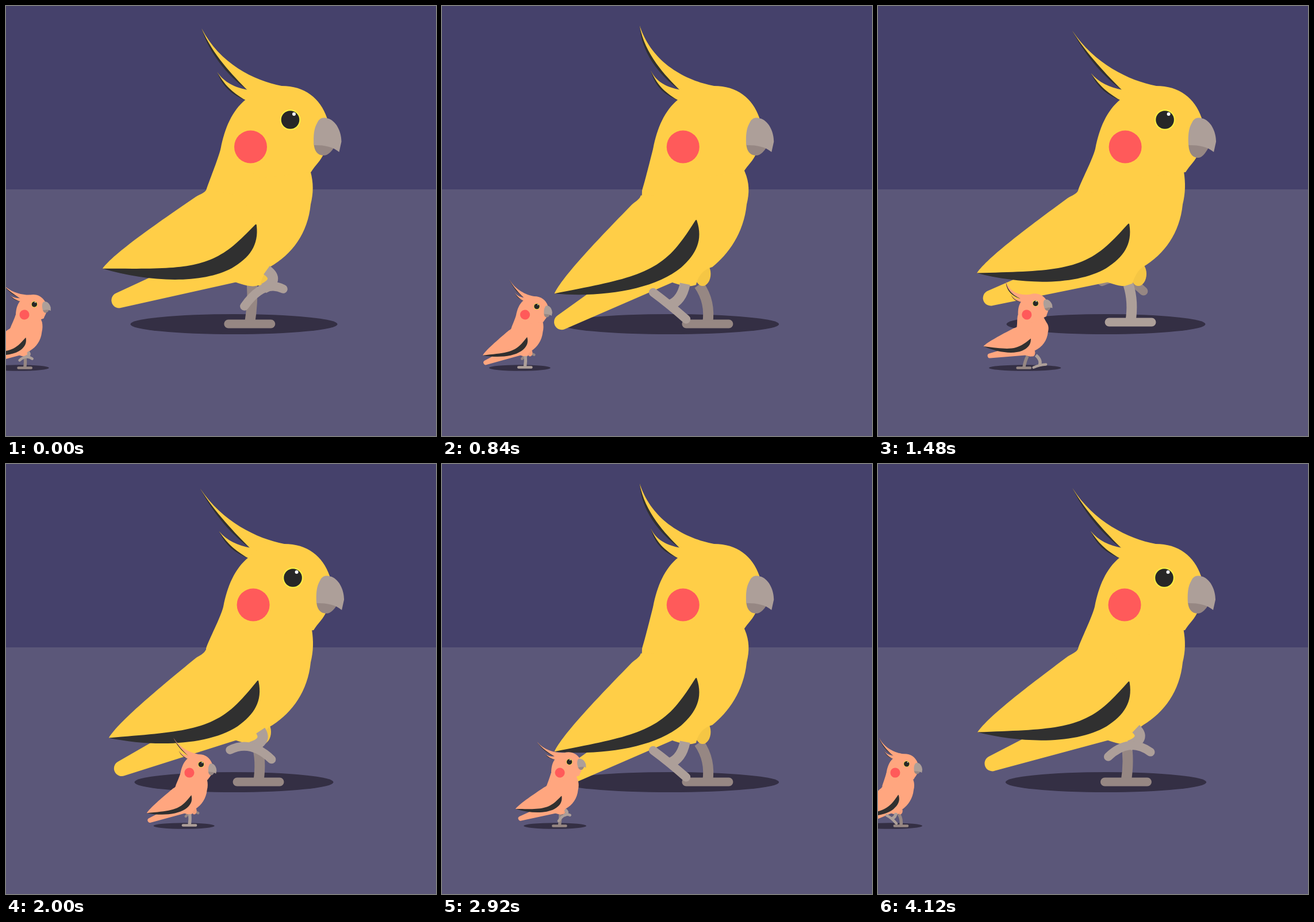
Write an HTML page with a canvas that moves like this. It is 748 by 748 pixels and loops after 4.16 s.

```html
<!DOCTYPE html>
<html>
<head>
<meta charset="utf-8">
<style>
html, body { margin: 0; height: 100%; overflow: hidden; background: #5b5779; }
canvas { display: block; }
</style>
</head>
<body>
<canvas id="stage" width="748" height="748"></canvas>
<script>
const ctx = document.getElementById('stage').getContext('2d');
const LOOP = 4160, STEP = 1040, RAD = Math.PI / 180;
const INK = '#303030', LIGHT = '#ad9f99', DARK = '#968783';

const wave = (t, peak, period) => Math.cos(2 * Math.PI * (t - peak) / period);
const ease = s => s * s * (3 - 2 * s);
const clamp = v => Math.min(1, Math.max(0, v));

function fill(d, color) {
  ctx.fillStyle = color;
  ctx.fill(new Path2D(d));
}

function oval(x, y, rx, ry, color) {
  ctx.fillStyle = color;
  ctx.beginPath();
  ctx.ellipse(x, y, rx, ry, 0, 0, 7);
  ctx.fill();
}

function turned(x, y, degrees, draw) {
  ctx.save();
  ctx.translate(x, y);
  ctx.rotate(degrees * RAD);
  ctx.translate(-x, -y);
  draw();
  ctx.restore();
}

function bend(x1, y1, cx, cy, x2, y2, width, cap) {
  ctx.lineWidth = width;
  ctx.lineCap = cap;
  ctx.beginPath();
  ctx.moveTo(x1, y1);
  ctx.quadraticCurveTo(cx, cy, x2, y2);
  ctx.stroke();
}

// Half of the cycle the foot slides back on the ground, half it swings forward
function leg(u, ground, height, color) {
  u = (u + .3) % 1 - .3;
  const s = clamp((u - .2) / .5);
  const rise = Math.sin(Math.PI * s);
  const curl = 32 * Math.max(0, Math.sin(Math.PI * (s - .2) / .8));
  const x = s ? 384 + 99 * ease(s) : 424 - 198 * u;
  const y = ground - height * rise;
  const angle = 40 * Math.sin(2 * Math.PI * s) * RAD;
  const dx = 37 * Math.cos(angle), dy = 37 * Math.sin(angle);

  ctx.strokeStyle = color;
  bend(216 + x / 2 + 14 * rise, 485 - .8 * curl,
    x + 6 + 24 * rise, 515 - 1.2 * curl, x, y - curl / 2, 18, 'butt');
  bend(x - dx, y - dy, x, y - curl, x + dx, y + dy, 15, 'round');
}

function head(sway, jaw, eye, color) {
  const tx = 350 - 18.2 * sway, ty = 33.6 + 9.5 * sway;
  const lx = 368.2 - 3.7 * sway, ly = 112 + 5 * sway;
  fill(`M478 139C430 130 370 100 ${tx} ${ty}C352 78 384 118 418 146L440 175Z`, color);
  fill(`M${tx} ${ty}C351 80 382 120 418 146C394 122 357 84 ${tx} ${ty}Z`, INK);
  fill(`M${lx} ${ly}C378 133 397 142 420 146L440 170L414 163C398 157 378 142 ${lx} ${ly}Z`, color);
  fill(`M${lx} ${ly}C376 143 394 155 415 164C396 152 381 142 ${lx} ${ly}Z`, INK);
  fill('M372 248C379 212 392 182 415 163L440 141L478 139C518 139 545 160 557 195L552 255C546 270 537 276 529 289L440 300Z', color);

  const chin = 260 + jaw;
  fill(`M534 238C534 ${chin - 9} 540 ${chin} 551 ${chin}C559 ${chin} 566 252 570 244Z`, DARK);
  fill('M540 203C544 194 551 193 560 196C575 202 582 221 582 236L578 254C567 245 554 242 534 242C533 226 534 213 540 203Z', LIGHT);
  if (eye > 0) {
    oval(493, 198, 18, 18 * eye, '#ffee46');
    oval(493, 198, 15.8, 15.8 * eye, '#272727');
    oval(499.5, 198 - 10 * eye, 3, 3 * eye, '#fff');
  }
  oval(424, 245, 28.5, 28.5, '#ff5a5a');
}

// Draws the walker at gait time t, with its head thrown back by tilt degrees
function bird(t, color, eye, tilt) {
  const u = t / STEP;
  const sway = wave(t, 445, STEP / 2);
  const k = 11.7 * sway - 5.6;
  const lean = 10.4 * wave(t, 205, STEP) - 3.4;
  const thigh = 450 - 9 * wave(u, .12, 1);
  const jaw = 4 * Math.max(0, wave(t, 440, STEP)) ** 8;

  oval(396.5, 553.5, 191 - 18 * sway, 17.5, '#342f44');
  leg(u, 553, 66, DARK);
  oval(thigh, 466, 14, 21, color);
  oval(thigh, 466, 14, 21, 'rgba(0,0,0,.04)');

  turned(400, 470, 10.5 * wave(t, 230, STEP) - 1.9, () =>
    fill('M201 525A13.5 13.5 0 0 1 191 500L260 468L400 430L425 470L402 480Z', color));

  fill(`M${372 + k} 248C${367 + k} 268 353 305 348 321L345 420L390 477
    C405 482 425 492 442 485C446 470 453 459 ${459 - lean} 454
    C498 432 525 395 530 345C535 325 535 308 ${529 + k / 2} 288
    L${500 + k} 220L${400 + k} 220Z`, color);

  turned(400, 340, lean, () => {
    fill('M349 319C345 326 338 327 330 332C260 380 188 430 168 457C250 470 340 470 400 425L435 380L410 330Z', color);
    fill('M168 457C290 457 346 461 400 413C413 402 424 390 434 380Q436 379 436 382C440 416 424 438 393 456C339 485 245 480 168 457Z', INK);
  });

  ctx.save();
  ctx.translate(k, 0);
  turned(424, 245, -tilt, () => head(sway, jaw, eye, color));
  ctx.restore();
  leg(u + .5, 550, 45, LIGHT);
}

const openness = gap => clamp((Math.abs(gap) - 50) / 60);

function paint(t) {
  ctx.fillStyle = '#45416b';
  ctx.fillRect(0, 0, 748, 319);
  ctx.fillStyle = '#5b5779';
  ctx.fillRect(0, 319, 748, 429);

  bird(t % STEP, '#ffce47', openness(t % STEP - 840), 0);

  // The small one runs ahead with quick steps, then drops back
  const x = 47 - 140 * wave(t, -40, LOOP) - 4 * wave(t, -40, LOOP / 3);
  const turn = 225 + 12 * 360 * t / LOOP + 90 * wave(t, 650, LOOP);
  const tilt = 7 + 11 * Math.cos((turn - 340) * RAD);
  ctx.save();
  ctx.translate(x, 463.5);
  ctx.scale(.3, .3);
  bird((205 + turn / 360 * STEP) % STEP, '#ffa67f', openness(t - 3560), tilt);
  ctx.restore();
}

const start = performance.now();
function loop() {
  paint((performance.now() - start) % LOOP);
  requestAnimationFrame(loop);
}
loop();
</script>
</body>
</html>
```
